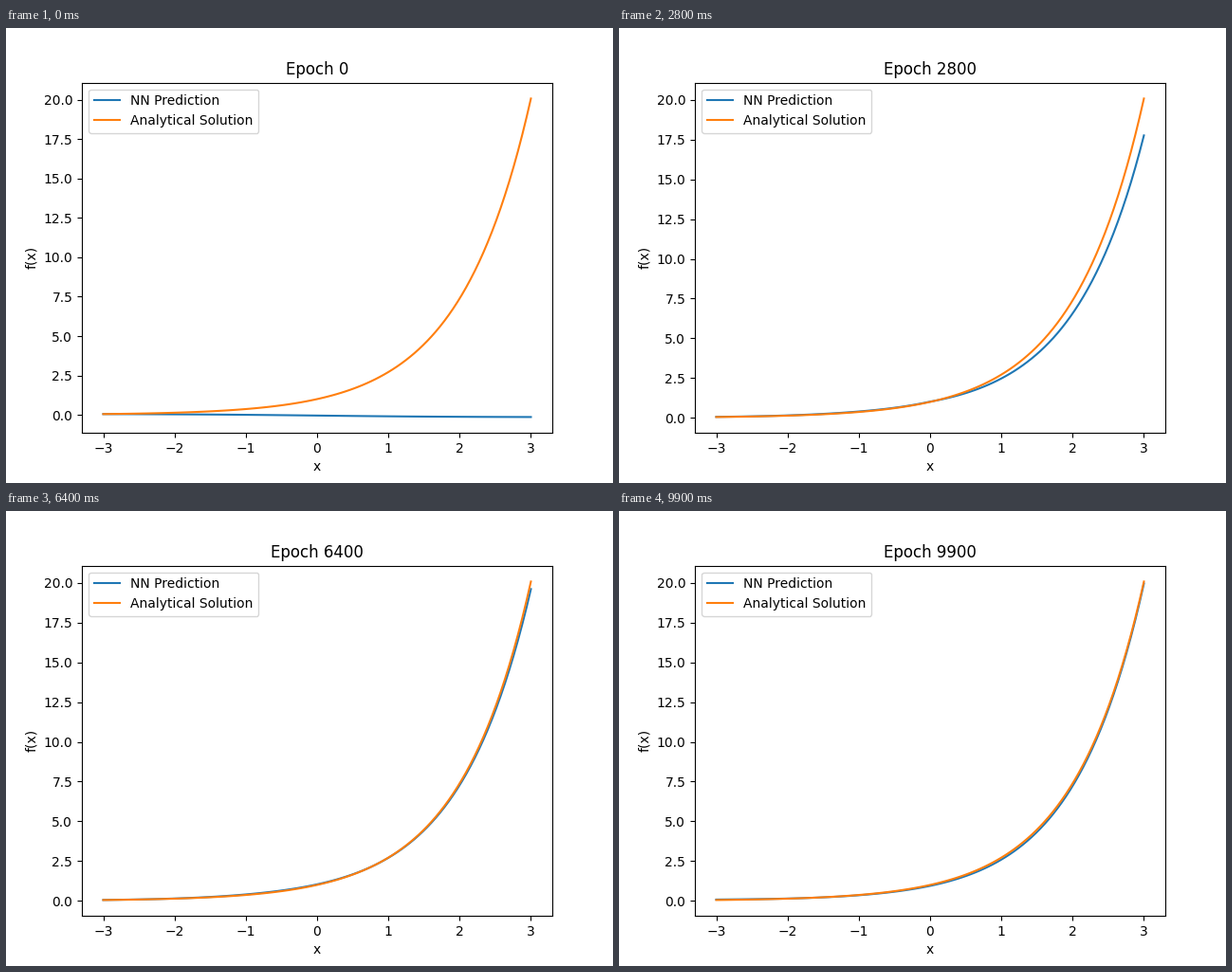
These frames come from a looping animation (640 by 480 pixels, 10 s). A matplotlib script:

```python
import numpy as np
import matplotlib.pyplot as plt
from matplotlib.animation import FuncAnimation

FRAMES, INTERVAL, STEP = 100, 100, 100

x = np.linspace(-3, 3, 100)
exact = np.exp(x)
right = np.maximum(x, 0)


def bump(center, width):
    return np.exp(-((x - center) / width) ** 2)


def lag(gain, rate):
    """Shortfall that builds up to the right of the initial condition."""
    return -gain * exact * (1 - np.exp(-rate * right))


def drift(gain, edge):
    """Proportional shortfall plus an offset at the left edge."""
    return -gain * exact + edge * bump(-3, 1)


# Epoch -> error of the network (prediction minus exact solution)
errors = {
    0: -0.045 - 0.103 * np.tanh(x / 2) - exact,
    800: lag(0.486, 1.65) - 0.145 * np.exp(right),
    2800: lag(0.117, 1.6) + 0.01 + 0.02 * bump(-1, 1),
    5500: drift(0.0165, 0.02),
    7300: 0.12 * bump(-0.3, 1.4) - 0.68 * np.exp(1.9 * (x - 3)) + drift(0, -0.02),
    8400: drift(0.003, 0.012),
    9300: drift(0.0125, -0.04),
    9900: -0.16 * bump(2, 2) + drift(0, 0.03),
}
epochs = list(errors)


def predict(epoch):
    """Blend neighbouring errors so that the end point decays geometrically."""
    k = min(np.searchsorted(epochs, epoch, side="right"), len(epochs) - 1)
    start, stop = epochs[k - 1], epochs[k]
    a, b = errors[start], errors[stop]
    u = (epoch - start) / (stop - start)
    ratio = b[-1] / a[-1]
    w = (1 - ratio ** u) / (1 - ratio)
    return exact + a + (b - a) * w


fig, ax = plt.subplots(figsize=(6.4, 4.8), dpi=100)
net_line, = ax.plot(x, predict(0), label="NN Prediction")
ax.plot(x, exact, label="Analytical Solution")
ax.set_xlabel("x")
ax.set_ylabel("f(x)")
ax.legend(loc="upper left")
title = ax.set_title("Epoch 0")


def update(i):
    epoch = i * STEP
    net_line.set_data(x, predict(epoch))
    title.set_text(f"Epoch {epoch}")
    ax.relim()
    ax.autoscale_view()
    return net_line, title


anim = FuncAnimation(fig, update, frames=FRAMES, interval=INTERVAL,
                     repeat=True, repeat_delay=0, blit=False)
plt.show()
```
